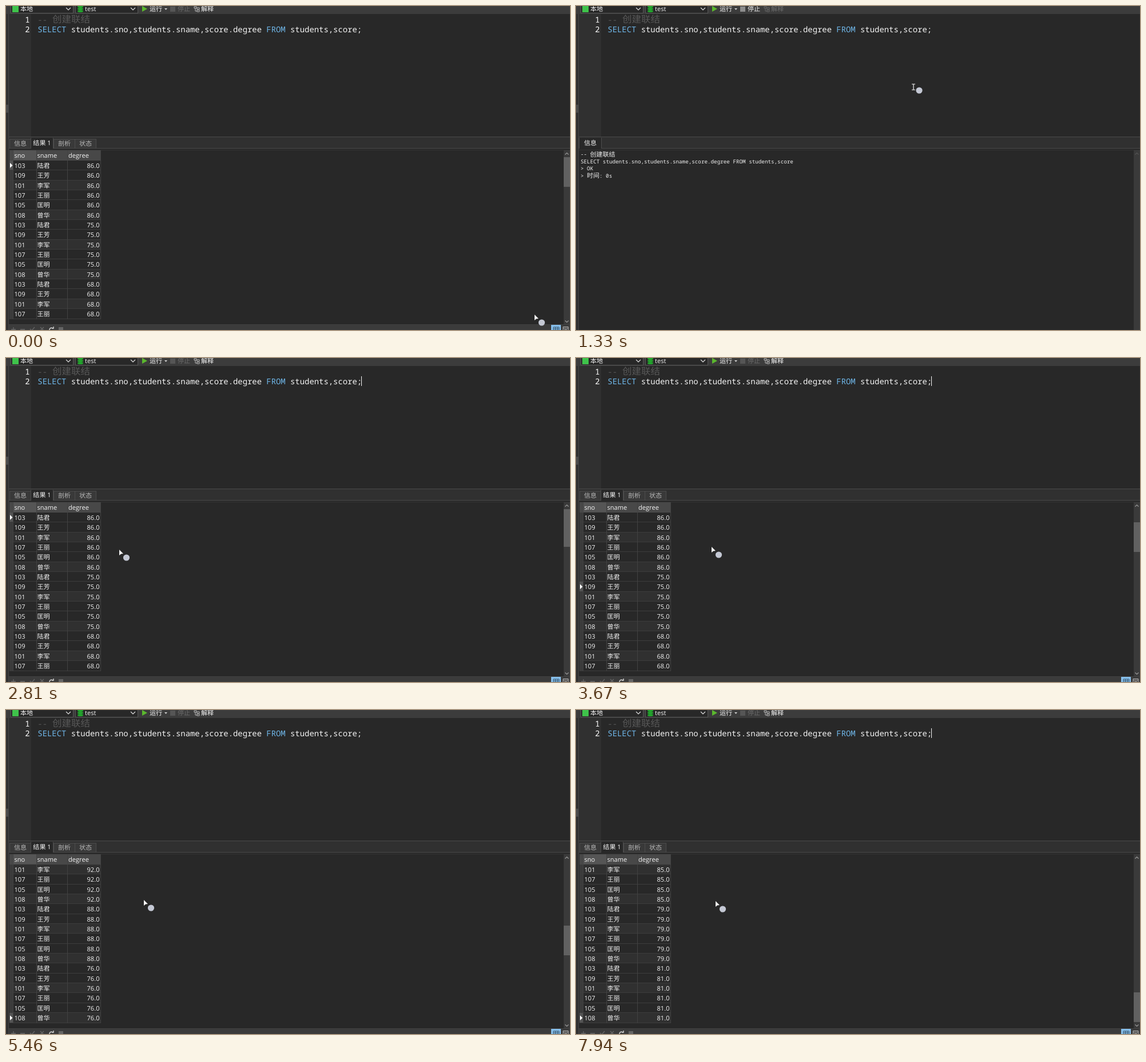
Write an HTML page that moves like this. It is 986 by 568 pixels and loops after 8 s.

```html
<!DOCTYPE html>
<html lang="zh-CN">
<head>
<meta charset="utf-8">
<title>SQL join query</title>
<style>
  html, body { margin: 0; width: 100%; height: 100%; overflow: hidden; background: #282828; }
  svg { display: block; width: 986px; height: 568px; }
  text { font: 11.1px "Open Sans", "Noto Sans CJK SC", "Noto Sans CJK", sans-serif; fill: #f4f4f4;
    white-space: pre; text-rendering: geometricPrecision; }
  .code { font: 13.9px "Noto Sans Mono", monospace; }
  .log { font: 9.25px "Noto Sans Mono", monospace; }
  .cjk { font: 300 16.5px "Noto Sans CJK SC", "Noto Sans CJK", sans-serif; }
  .logcjk { font: 11px "Noto Sans CJK SC", "Noto Sans CJK", sans-serif; }
  rect { shape-rendering: crispEdges; }
</style>
</head>
<body>
<svg id="stage" viewBox="0 0 986 568"></svg>
<script>
const LOOP = 8000, TICK = 80, BLINK = 528;
const RUN_START = 1230, RUN_END = 1630, SCROLL_START = 3120;
const ROW_H = 17.36, GRID_TOP = 270.8, VISIBLE = 16;
const STUDENTS = [["103", "陆君"], ["109", "王芳"], ["101", "李军"],
                  ["107", "王丽"], ["105", "匡明"], ["108", "曾华"]];
const DEGREES = [86, 75, 68, 92, 88, 76, 64, 91, 78, 85, 79, 81];
const LAST_ROW = STUDENTS.length * DEGREES.length - 1;

// Pointer moves and scroll bursts: start time, number of ticks, where they end.
const MOVES = [
  { start: 70, ticks: 8, to: [590, 142], ease: k => k * k * (3 - 2 * k) },
  { start: 1860, ticks: 3, to: [248, 279] },
  { start: 2100, ticks: 2, to: [125, 363] },
  { start: 2340, ticks: 2, to: [119, 347] },
  { start: 2570, ticks: 6, to: [237, 332] },
  { start: 4050, ticks: 33, to: [244, 336] }
];
const BURSTS = [
  { start: SCROLL_START, ticks: 8, to: 7 },
  { start: 4050, ticks: 3, to: 13 },
  { start: 4520, ticks: 2, to: 19 },
  { start: 4910, ticks: 2, to: 23 },
  { start: 5300, ticks: 3, to: 35 },
  { start: 5770, ticks: 2, to: 44 },
  { start: 6310, ticks: 2, to: 55 },
  { start: 7160, ticks: 2, to: LAST_ROW }
];

// Share of a move done by time t; it advances in whole ticks.
function progress({ start, ticks }, t) {
  const done = Math.floor((t - start + TICK / 4) / TICK) + 1;
  return Math.min(Math.max(done / ticks, 0), 1);
}

function pointerAt(t) {
  let x = 924, y = 542;
  for (const move of MOVES) {
    const k = (move.ease || (p => p))(progress(move, t));
    x += (move.to[0] - x) * k;
    y += (move.to[1] - y) * k;
  }
  return [Math.round(x), Math.round(y)];
}

// A fast burst leaves the grid half repainted until its last tick.
function scrollAt(t) {
  let current = 0, torn = false;
  for (const burst of BURSTS) {
    const k = progress(burst, t), rows = burst.to - current;
    if (k > 0 && k < 1 && rows / burst.ticks > 5) torn = true;
    current += Math.round(rows * k);
    if (k < 1) break;
  }
  return { current, torn };
}

const box = (x, y, w, h, fill) =>
  `<rect x="${x}" y="${y}" width="${w}" height="${h}" fill="${fill}"/>`;
const text = (x, y, s, fill = "#f4f4f4", cls = "", anchor = "start") =>
  `<text x="${x}" y="${y}" class="${cls}" text-anchor="${anchor}" style="fill:${fill}">${s}</text>`;
const shape = (d, fill) => `<path d="${d}" fill="${fill}"/>`;
const line = (d, stroke, width = 1) =>
  `<path d="${d}" fill="none" stroke="${stroke}" stroke-width="${width}"/>`;
const chevron = (x, y, dir, color, r = 4) =>
  line(`M${x - r} ${y - dir * r / 2}l${r} ${dir * r}l${r} ${-dir * r}`, color, 1.2);

function frame() {
  return box(0, 0, 986, 568, "#282828")
    + box(0, 0, 986, 14, "#3c3c3c")
    + box(0, 14, 4, 554, "#303030") + box(4, 14, 1, 554, "#464646")
    + box(0, 173, 4, 14, "#4a4a4a")
    + box(5, 14, 39, 215, "#303030")
    + box(5, 229, 981, 1, "#4a4a4a") + box(5, 230, 981, 19, "#303030")
    + box(5, 249, 981, 1, "#4a4a4a") + box(5, 252, 981, 1, "#343434");
}

function toolbar(running) {
  const on = "#f4f4f4", off = "#6c6c6c";
  const combo = (x, w) => box(x, -2, w, 15, "#565656") + box(x + 1, -2, w - 2, 14, "#282828")
    + chevron(x + w - 9, 5, 1, "#e0e0e0");
  const disks = [1, 5, 9].map(y =>
    `<ellipse cx="130" cy="${y}" rx="5" ry="2" fill="#22a52c"/>`).join("");
  return combo(8, 110) + combo(121, 110)
    + box(11, 0, 11, 11, "#3fc34b") + text(25, 9, "本地")
    + disks + text(138, 9, "test")
    + shape("M238 0L247 5L238 10Z", "#5bb82e") + text(251, 9, "运行")
    + shape("M277 4h5l-2.5 3Z", "#d0d0d0")
    + box(287, 1, 9, 9, running ? "#8d8d8d" : "#555") + text(300, 9, "停止", running ? on : off)
    + line("M329 1h4v3h-4ZM331 4v5h3M334 3h4v3h-4ZM334 7h4v3h-4Z", running ? "#666" : "#b8b8b8")
    + text(341, 9, "解释", running ? off : on);
}

function editor() {
  const key = s => `<tspan fill="#6fb6e8">${s}</tspan>`;
  const sql = `${key("SELECT")} students.sno,students.sname,score.degree ${key("FROM")} students,score;`;
  return text(41.5, 28.5, "1", "#fff", "code", "end") + text(41.5, 45.5, "2", "#fff", "code", "end")
    + text(55.3, 28.5, "--", "#585858", "code") + text(81, 29, "创建联结", "#585858", "cjk")
    + text(55.3, 45.5, sql, "#f4f4f4", "code");
}

function tab(x, w, label, active) {
  const y = active ? 231 : 233;
  return box(x, y, w, active ? 19 : 16, "#4c4c4c")
    + box(x + 1, y + (active ? 0 : 1), w - 2, active ? 19 : 15, active ? "#282828" : "#393939")
    + text(x + w / 2, active ? 244 : 245, label, active ? "#f4f4f4" : "#b8b8b8", "", "middle");
}

function messages() {
  const out = "SELECT students.sno,students.sname,score.degree FROM students,score";
  const log = (x, y, s, cls = "log") => text(x, y, s, "#f0f0f0", cls);
  return tab(5, 40, "信息", true)
    + box(975, 253, 11, 315, "#3a3a3a") + chevron(980.5, 259, -1, "#555", 3)
    + log(8, 263, "--") + log(24.5, 263.5, "创建联结", "logcjk")
    + log(8, 275.5, out) + log(8, 288, "&gt; OK")
    + log(8, 300.5, "&gt;") + log(19, 301, "时间", "logcjk") + log(41, 300.5, ": 0s");
}

function row(pos, idx) {
  const y = GRID_TOP + pos * ROW_H, base = y + 13;
  const [sno, name] = STUDENTS[idx % STUDENTS.length];
  const degree = DEGREES[Math.floor(idx / STUDENTS.length)].toFixed(1);
  return (idx % 3 === 2 ? box(13, y, 153, ROW_H, "#303030") : "")
    + box(6, y, 7, ROW_H, "#3b3b3b") + box(6, y + ROW_H - 1, 160, 1, "#3d3d3d")
    + text(14.5, base, sno) + text(54.5, base, name)
    + text(163.5, base, degree, "#f4f4f4", "", "end");
}

function grid(current, torn) {
  const first = Math.max(0, current - VISIBLE + 1);
  const y = GRID_TOP + (current - first) * ROW_H;
  let s = "";
  for (let pos = 0; pos < VISIBLE; pos++) {
    const stale = torn && pos >= VISIBLE - 2;
    s += row(pos, first + pos - stale);
  }
  s += box(6, y, 7, ROW_H - 1, "#545454");
  if (!torn) s += shape(`M7 ${y + 4.3}l4.5 4.3l-4.5 4.3Z`, "#fff");
  s += box(6, 253, 160, 17, "#484848") + box(13, 253, 40, 17, "#555");
  for (const x of [12, 53, 107, 165]) s += box(x, 253, 1, 296, "#424242");
  return s + box(6, 270, 160, 1, "#484848")
    + text(14.5, 266, "sno") + text(54.5, 266, "sname") + text(109, 266, "degree");
}

function scrollbar(current, height) {
  const y = 265 + Math.round(current / LAST_ROW * 230);
  return box(975, 253, 11, 306, "#3a3a3a") + box(975, y, 11, height, "#616161")
    + chevron(980.5, 259, -1, "#999", 3) + chevron(980.5, 553, 1, "#999", 3);
}

function footer() {
  return box(5, 558, 981, 10, "#3b3b3b") + box(5, 558, 981, 1, "#424242")
    + line("M9 567h8M13 563v5M25 567h8M42 566l3 3l5-6M60 563l6 6M66 563l-6 6", "#666", 1.3)
    + line("M82.5 566a3.5 3.5 0 1 0 .2 3M80 565h3v-3", "#d6d6d6", 1.4)
    + box(92, 563, 8, 5, "#646464")
    + box(953, 559, 17, 9, "#86bfec")
    + line("M957 563h10v6M957 563v5M957 566h10M960.5 563v5M964 563v5", "#34536b")
    + line("M974 562.5h9v6M974 562.5v6M974 565h9M976 567.5h5", "#b8b8b8");
}

function results(t) {
  const { current, torn } = scrollAt(t);
  // The thumb is longer after a run, until scrolling fetches every row.
  const thumb = t >= RUN_END && t < SCROLL_START ? 66 : 52;
  return tab(6, 38, "信息") + tab(83, 38, "剖析") + tab(120, 38, "状态")
    + tab(43, 40, "结果 1", true)
    + grid(current, torn) + scrollbar(current, thumb) + footer();
}

function pointer(t) {
  const [x, y] = pointerAt(t);
  const beam = y < 230;
  const [dx, dy] = beam ? [10, 6] : [12.5, 13];
  const tip = beam
    ? line(`M${x - 3} ${y - 5}h6M${x} ${y - 5}v10M${x - 3} ${y + 5}h6`, "#f4f4f4", 1.2)
    : shape(`M${x} ${y - 1}v10l3-2.4l4-.6Z`, "#f8f8f8");
  return `<circle cx="${x + dx}" cy="${y + dy}" r="5.6" fill="#c4c8d4"/>` + tip;
}

const stage = document.getElementById("stage");
stage.innerHTML = frame() + editor() + "<g></g><g></g>";
const [panes, overlay] = stage.querySelectorAll("g");
const shown = new Map();

function paint(node, markup) {
  if (shown.get(node) === markup) return;
  shown.set(node, markup);
  node.innerHTML = markup;
}

function draw() {
  const t = performance.now() % LOOP;
  const running = t >= RUN_START && t < RUN_END;
  const caretOn = Math.floor((t - 500) / BLINK) % 2 === 0;
  paint(panes, toolbar(running) + (running ? messages() : results(t)));
  paint(overlay, (caretOn ? box(621, 32, 1, 17, "#f4f4f4") : "") + pointer(t));
  requestAnimationFrame(draw);
}
draw();
</script>
</body>
</html>
```
